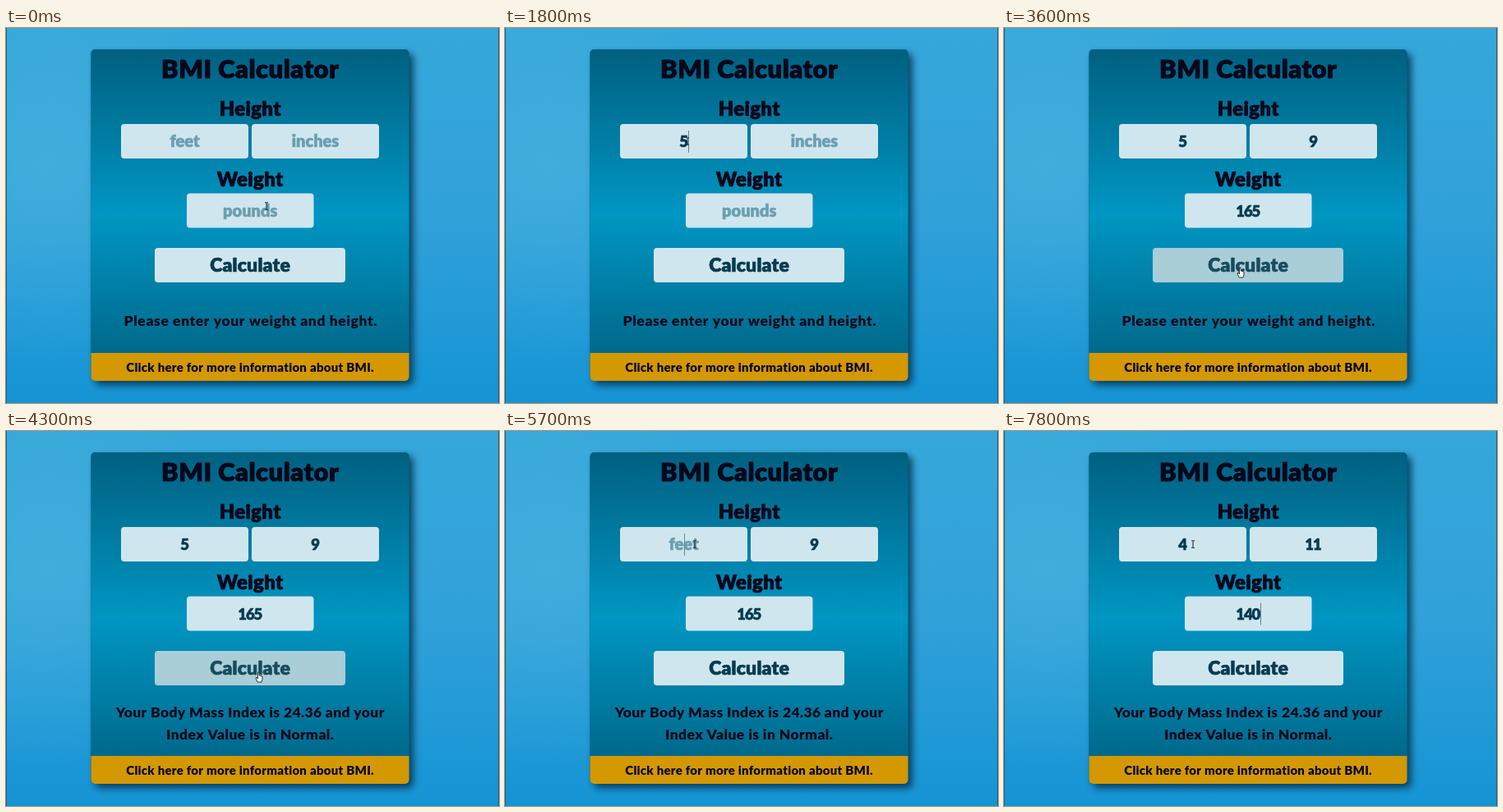
These frames come from a looping animation (600 by 457 pixels, 8 s). An HTML page with a canvas:

```html
<!DOCTYPE html>
<html lang="en">
<head>
<meta charset="utf-8">
<title>BMI Calculator</title>
<style>
html, body { margin: 0; width: 100%; height: 100%; overflow: hidden; background: #2d9fda; }
canvas { display: block; width: 600px; height: 457px; }
</style>
</head>
<body>
<canvas id="stage"></canvas>
<script>
const W = 600, H = 457, LOOP = 8000;
const canvas = document.getElementById('stage');
const ctx = canvas.getContext('2d');
const dpr = window.devicePixelRatio || 1;
canvas.width = W * dpr;
canvas.height = H * dpr;

const INK = '#06071b', FIELD_INK = '#073b4f', HINT = '#6b9faf', FIELD = '#d0e6ef';
const button = { x: 181, y: 268, w: 232, h: 42 };

// Each value list holds [time, content] steps.
const fields = [
  { x: 140, y: 117, w: 155, hint: 'feet', steps: [[0, ''], [1500, '5'], [5400, ''], [6200, '4']] },
  { x: 299, y: 117, w: 155, hint: 'inches', steps: [[0, ''], [2200, '9'], [6600, '1'], [6800, '11']] },
  { x: 220, y: 201.5, w: 154.5, hint: 'pounds',
    steps: [[0, ''], [2900, '1'], [3000, '16'], [3080, '165'], [7200, '1'], [7400, '14'], [7600, '140']] }
];

// Index of the focused field, -1 for none.
const focusSteps = [[0, -1], [900, 0], [1900, 1], [2850, 2], [3850, -1], [5200, 0], [6400, 1], [7000, 2]];

const path = [
  [0, 317, 217], [250, 317, 217], [850, 222, 138], [3200, 222, 138], [3550, 288, 296],
  [3700, 288, 296], [4250, 308, 298], [4750, 308, 298], [5150, 231, 138], [8000, 230, 138]
];

const lastStep = (steps, t) => steps.filter(s => s[0] <= t).pop();

function pointerAt(t) {
  const i = path.findIndex(p => p[0] > t);
  const [t0, x0, y0] = path[i - 1], [t1, x1, y1] = path[i];
  const u = (t - t0) / (t1 - t0), e = u * u * (3 - 2 * u);
  return { x: x0 + (x1 - x0) * e, y: y0 + (y1 - y0) * e };
}

const inside = (p, r) => p.x >= r.x && p.x <= r.x + r.w && p.y >= r.y && p.y <= r.y + (r.h || 42);

function box(x, y, w, h, r, fill) {
  ctx.beginPath();
  ctx.roundRect(x, y, w, h, r);
  ctx.fillStyle = fill;
  ctx.fill();
}

// Heavy centred text; a thin round stroke softens the corners of large sizes.
function text(str, x, y, size, color, spacing = 0) {
  ctx.font = `900 ${size}px Lato, "Open Sans", sans-serif`;
  ctx.letterSpacing = spacing + 'px';
  ctx.textAlign = 'center';
  ctx.fillStyle = ctx.strokeStyle = color;
  ctx.fillText(str, x + spacing / 2, y);
  if (size < 18) return;
  ctx.lineJoin = 'round';
  ctx.lineWidth = size * 0.03;
  ctx.strokeText(str, x + spacing / 2, y);
}

function gradient(x0, y0, x1, y1, ...colors) {
  const g = ctx.createLinearGradient(x0, y0, x1, y1);
  colors.forEach((c, i) => g.addColorStop(i / (colors.length - 1), c));
  return g;
}

function glow(x, y, r, color) {
  const g = ctx.createRadialGradient(x, y, 0, x, y, r);
  g.addColorStop(0, `rgba(${color}, .6)`);
  g.addColorStop(1, `rgba(${color}, 0)`);
  ctx.fillStyle = g;
  ctx.fillRect(0, 0, W, H);
}

function drawBackdrop() {
  ctx.fillStyle = gradient(0, 0, 0, H, '#36a7da', '#31a1d9', '#1594d4');
  ctx.fillRect(0, 0, W, H);
  glow(50, 170, 240, '74, 180, 222');
  ctx.fillStyle = '#17638f';
  ctx.fillRect(0, 0, 1, H);
  ctx.fillRect(W - 1, 0, 1, H);
}

function drawCard() {
  ctx.save();
  ctx.shadowColor = 'rgba(0, 45, 70, .85)';
  ctx.shadowBlur = 10 * dpr;
  ctx.shadowOffsetX = 5 * dpr;
  ctx.shadowOffsetY = 5 * dpr;
  box(103.5, 26, 387, 404, 5, '#006080');
  ctx.restore();
  box(103.5, 26, 387, 404, 5, gradient(0, 26, 0, 430, '#006080', '#0096c3', '#006080'));
  box(103.5, 396, 387, 34, [0, 0, 5, 5], '#d39802');

  text('BMI Calculator', 297, 61, 31, INK, 0.45);
  text('Height', 297, 107, 24, INK, 0.3);
  text('Weight', 297, 192.5, 24, INK, 0.3);
  text('Click here for more information about BMI.', 297, 419, 15, INK, 0.25);
}

function drawField(f, t, focused) {
  box(f.x, f.y, f.w, 42, 4, FIELD);
  const [since, value] = lastStep(f.steps, t);
  const cx = f.x + f.w / 2, base = f.y + 28;
  if (value) text(value, cx, base, 18.5, FIELD_INK, value.length > 1 ? -1.2 : 0);
  else text(f.hint, cx, base, 20, HINT);
  if (!focused) return;

  const start = Math.max(since, lastStep(focusSteps, t)[0]);
  if (Math.floor((t - start) / 500) % 2) return;
  const half = value ? ctx.measureText(value).width / 2 : 0;
  ctx.fillStyle = '#64838f';
  ctx.fillRect(Math.round(cx + half), f.y + 8, 1, 27);
}

function drawMessage(t) {
  if (t < 3900) {
    text('Please enter your weight and height.', 297.5, 362.5, 17.5, INK, 0.6);
  } else {
    text('Your Body Mass Index is 24.36 and your', 297, 349, 17.5, INK, 0.35);
    text('Index Value is in Normal.', 297, 376, 17.5, INK, 0.4);
  }
}

function shape(points, x, y) {
  ctx.beginPath();
  points.forEach(([px, py]) => ctx.lineTo(x + px, y + py));
  ctx.closePath();
  ctx.fillStyle = '#fff';
  ctx.strokeStyle = '#16232b';
  ctx.lineWidth = 0.9;
  ctx.fill();
  ctx.stroke();
}

function drawIBeam({ x, y }) {
  ctx.strokeStyle = '#1b323e';
  ctx.lineWidth = 1.1;
  ctx.beginPath();
  ctx.moveTo(x - 2, y - 4.5);
  ctx.lineTo(x, y - 4);
  ctx.lineTo(x + 2, y - 4.5);
  ctx.moveTo(x, y - 4);
  ctx.lineTo(x, y + 4);
  ctx.moveTo(x - 2, y + 4.5);
  ctx.lineTo(x, y + 4);
  ctx.lineTo(x + 2, y + 4.5);
  ctx.stroke();
}

const HAND = [[-1.5, -4], [0, -4], [0.3, 0], [4, 1], [4, 5], [3, 8], [-2, 8], [-4, 3], [-3, 2], [-1.5, 4]];
const ARROW = [[0, 0], [0, 10], [2.4, 8], [4, 11], [5.4, 10.3], [4, 7.4], [7, 7.2]];

function drawPointer(p) {
  if (inside(p, button)) shape(HAND, p.x, p.y);
  else if (fields.some(f => inside(p, f))) drawIBeam(p);
  else shape(ARROW, p.x, p.y);
}

function draw(t) {
  ctx.setTransform(dpr, 0, 0, dpr, 0, 0);
  const pointer = pointerAt(t);
  const hover = inside(pointer, button);
  const focus = lastStep(focusSteps, t)[1];

  drawBackdrop();
  drawCard();
  fields.forEach((f, i) => drawField(f, t, i === focus));
  box(button.x, button.y, button.w, button.h, 4, hover ? '#a9ced7' : FIELD);
  text('Calculate', 297, 297, 23, hover ? '#174c5e' : FIELD_INK, 0.2);
  drawMessage(t);
  drawPointer(pointer);
}

const begin = performance.now();
function tick() {
  draw((performance.now() - begin) % LOOP);
  requestAnimationFrame(tick);
}
tick();
</script>
</body>
</html>
```
